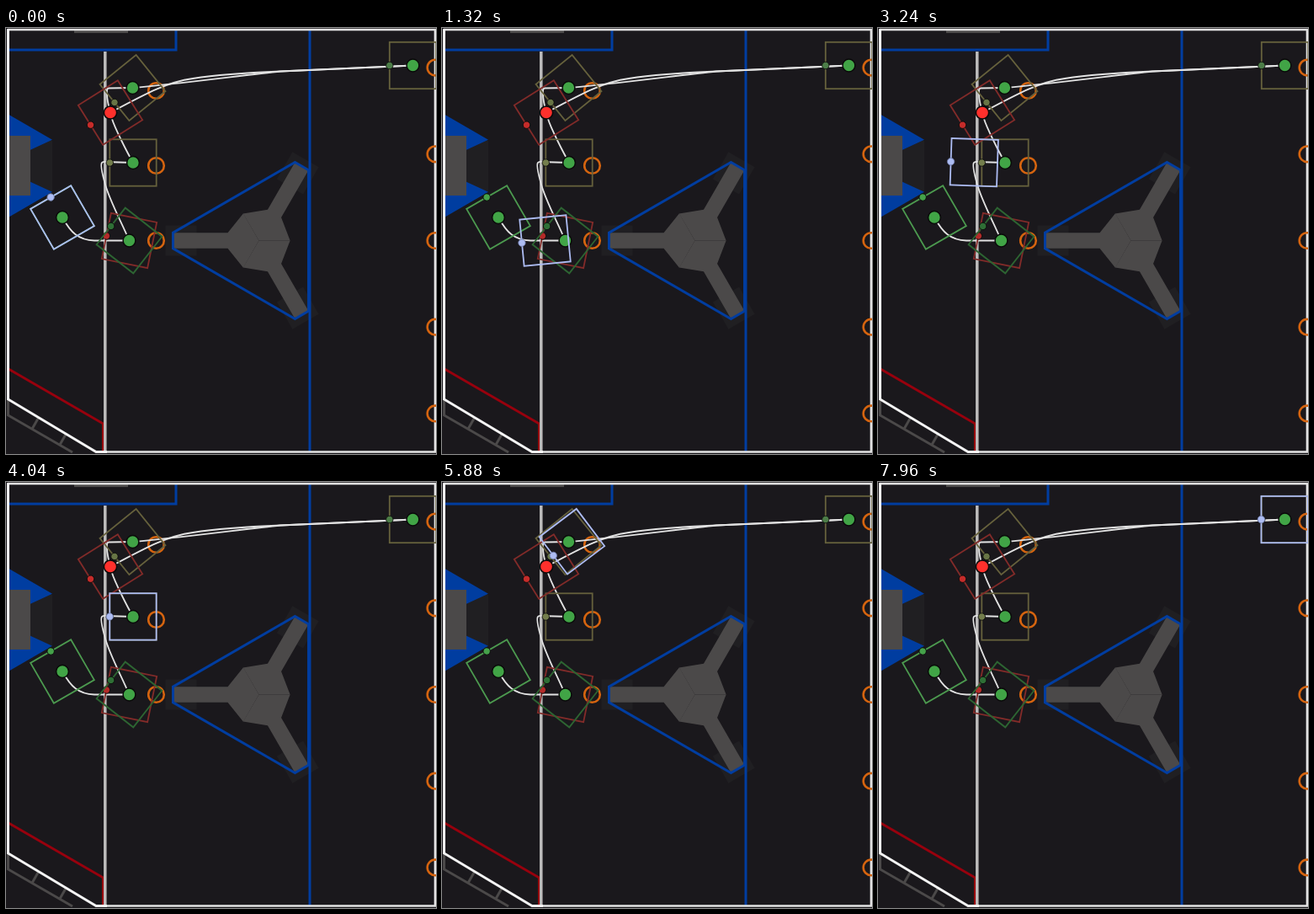
Write an HTML page with a canvas that moves like this. It is 511 by 506 pixels and loops after 8 s.

```html
<!DOCTYPE html>
<html lang="en">
<head>
<meta charset="utf-8">
<title>Robot path playback</title>
<style>
html, body { margin: 0; width: 100%; height: 100%; overflow: hidden; background: #1a181c; }
canvas { display: block; width: 511px; height: 506px; }
</style>
</head>
<body>
<canvas id="stage" width="511" height="506"></canvas>
<script>
const LOOP = 8000;
const HALF = 27.7;
const MID = 252.5;
const GROUND = '#1a181c', SHADE = '#201f22', GREY = '#4b4949', WHITE = '#f4f4f4';
const BLUE = '#003da0', ORANGE = '#d5640f', LAVENDER = '#adbcf3';
const GREEN = '#41a446', RED = '#ff302c';
const LIVE = '#4c9a4f', OLIVE = '#66613c', DIM_RED = '#822b29', DIM_GREEN = '#2d6532';
const ctx = document.getElementById('stage').getContext('2d');

const home = { x: 67, y: 225, deg: 240, color: LIVE, front: '#45a24a' };
const lowIn = { x: 146.5, y: MID, deg: 191.5, color: DIM_RED, front: '#b32b29' };
const lowOut = { ...lowIn, deg: 218, color: DIM_GREEN, front: '#2f6f36' };
const middle = { x: 151, y: 160, deg: 180, color: OLIVE, front: '#737d4c' };
const high = { x: 150.5, y: 71, deg: 141, color: OLIVE, front: '#687545' };
const far = { x: 483.5, y: 44.5, deg: 180, color: OLIVE, front: '#4c7d48' };
const finish = { x: 124, y: 100.5, deg: 148, color: DIM_RED, front: '#c62c2a' };
const lowHook = { x: 118, y: 159, deg: 180 };
const highHook = { x: 122, y: 71.5, deg: 180 };

// A leg runs from rest to rest; `curve` leads from stop a to stop b.
// `pace` speeds up the turn, `swing` makes it overshoot.
function leg(start, end, a, b, curve = 'L', { pace = 1, swing = 0 } = {}) {
  const d = `M${a.x} ${a.y}${curve} ${b.x} ${b.y}`;
  const el = document.createElementNS('http://www.w3.org/2000/svg', 'path');
  el.setAttribute('d', d);
  return { start, end, a, b, pace, swing, el, length: el.getTotalLength(), shape: new Path2D(d) };
}

const legs = [
  leg(180, 1970, home, lowIn, 'C77 243 86 252 105 252.5L', { swing: 30 }),
  leg(2310, 3390, lowOut, lowHook, 'C138 232 124 207 118 186C114 172 112 162 114 160Q115 158.5'),
  leg(3390, 4015, lowHook, middle),
  leg(4020, 4965, middle, highHook, 'C143 146 129 118 126 108C123 97 120 88 120 78Q119.5 71.5'),
  leg(4965, 5705, highHook, high),
  leg(5705, 8015, high, far, 'C200 67 290 55 326 51.5L', { pace: 1.75 })
];
const wayBack = leg(8015, 9000, far, finish, 'L326 51.5C290 53 245 56.5 222 60C192 64 168 77');

const clamp = u => Math.min(1, Math.max(0, u));
const accelerate = u => u < 0.5 ? 2 * u * u : 1 - 2 * (1 - u) ** 2;
const smooth = u => u * u * (3 - 2 * u);

function pose(t) {
  const l = legs.findLast(l => t >= l.start) || legs[0];
  const u = clamp((t - l.start) / (l.end - l.start));
  const { x, y } = l.el.getPointAtLength(l.length * accelerate(u));
  const turned = smooth(clamp(u * l.pace)) + l.swing * u ** 4 * (1 - u) ** 2;
  return { x, y, deg: l.a.deg + (l.b.deg - l.a.deg) * turned };
}

function trace(points, close) {
  ctx.beginPath();
  points.forEach(([x, y]) => ctx.lineTo(x, y));
  if (close) ctx.closePath();
}

function line(color, width, points, close) {
  trace(points, close);
  ctx.strokeStyle = color;
  ctx.lineWidth = width;
  ctx.stroke();
}

function fill(color, points) {
  trace(points, true);
  ctx.fillStyle = color;
  ctx.fill();
}

function box(color, x, y, w, h) {
  ctx.fillStyle = color;
  ctx.fillRect(x, y, w, h);
}

function circle(x, y, r) {
  ctx.beginPath();
  ctx.arc(x, y, r, 0, 2 * Math.PI);
}

function dot(x, y, r, color, edge = '#0a0a0a') {
  circle(x, y, r);
  ctx.fillStyle = color;
  ctx.fill();
  ctx.strokeStyle = edge;
  ctx.lineWidth = r / 5;
  ctx.stroke();
}

function ring(x, y) {
  circle(x, y, 9.3);
  ctx.strokeStyle = ORANGE;
  ctx.lineWidth = 2.6;
  ctx.stroke();
}

// Runs `paint` in a local frame at (x, y).
function at(x, y, deg, paint) {
  ctx.save();
  ctx.translate(x, y);
  ctx.rotate(deg * Math.PI / 180);
  paint();
  ctx.restore();
}

function bumper({ x, y, deg, color, front }, edge) {
  at(x, y, deg, () => {
    ctx.strokeStyle = color;
    ctx.lineWidth = 1.8;
    ctx.strokeRect(-HALF, -HALF, 2 * HALF, 2 * HALF);
    dot(HALF, 0, 4.2, front, edge);
  });
}

function drawGoal() {
  box(SHADE, 28, 134, 27, 60);
  for (const side of [-1, 1]) {
    const y = d => 163.7 + side * d;
    fill(BLUE, [[4, y(60.5)], [55, y(31)], [29, y(19)], [4, y(19)]]);
  }
  box(GREY, 4, 128, 25, 71);
}

// Three equal arms around one centre, wrapped by a blue outline.
function drawTruss() {
  const arms = paint => [180, 300, 60].forEach(deg => at(300.5, MID, deg, paint));
  const reach = 102, w = 9.3, inner = 37;
  arms(() => box(SHADE, 74, -18, 37, 36));
  line(BLUE, 3, [[361, 2], [361, 503]]);
  arms(() => fill(GREY, [[0, 0], [inner / 2, -inner * 0.87], [inner, -w], [reach, -w],
    [reach, w], [inner, w], [inner / 2, inner * 0.87]]));
  const outline = [180, 300, 60].flatMap(deg => [-w, w].map(v => {
    const a = deg * Math.PI / 180, c = Math.cos(a), s = Math.sin(a);
    return [300.5 + reach * c - v * s, MID + reach * s + v * c];
  }));
  line(BLUE, 3, outline, true);
}

function drawField() {
  box(GROUND, 0, 0, 511, 506);
  box(GREY, 81, 2, 64, 4);
  line(BLUE, 3, [[3, 26], [202, 26], [202, 2]]);
  drawGoal();
  drawTruss();

  line('#98000d', 3, [[3, 405], [115.5, 470], [115.5, 503]]);
  line('#bdbcbc', 3.5, [[117.8, 28], [117.8, 503]]);
  line(GREY, 3, [[2.5, 441], [2.5, 460], [79, 504]]);
  for (const x of [39, 72]) line(GREY, 3, [[x, 440 + x * 0.57], [x - 8, 454 + x * 0.57]]);
  line('#e4e4e4', 2.6, [[2, 2], [510, 2], [510, 503.5], [107, 503.5]]);
  line(WHITE, 3, [[2.5, 1], [2.5, 441], [107, 503.5], [120, 503.5]]);

  for (let i = 0; i < 3; i++) ring(178.5, MID - i * 89);
  for (let i = -2; i <= 2; i++) ring(510, MID + i * 102.7);
}

function drawPlan() {
  ctx.strokeStyle = '#e2e2e2';
  ctx.lineWidth = 1.8;
  [...legs, wayBack].forEach(l => ctx.stroke(l.shape));
  [home, lowIn, lowOut, middle, high, far, finish].forEach(s => bumper(s));
  [home, lowOut, middle, high, far].forEach(s => dot(s.x, s.y, 7.4, GREEN));
  dot(finish.x, finish.y, 7.6, RED);
}

function draw(t) {
  drawField();
  drawPlan();
  bumper({ ...pose(t), color: LAVENDER, front: LAVENDER }, '#6f7ba8');
}

const began = performance.now();
function tick() {
  draw((performance.now() - began) % LOOP);
  requestAnimationFrame(tick);
}
tick();
</script>
</body>
</html>
```
